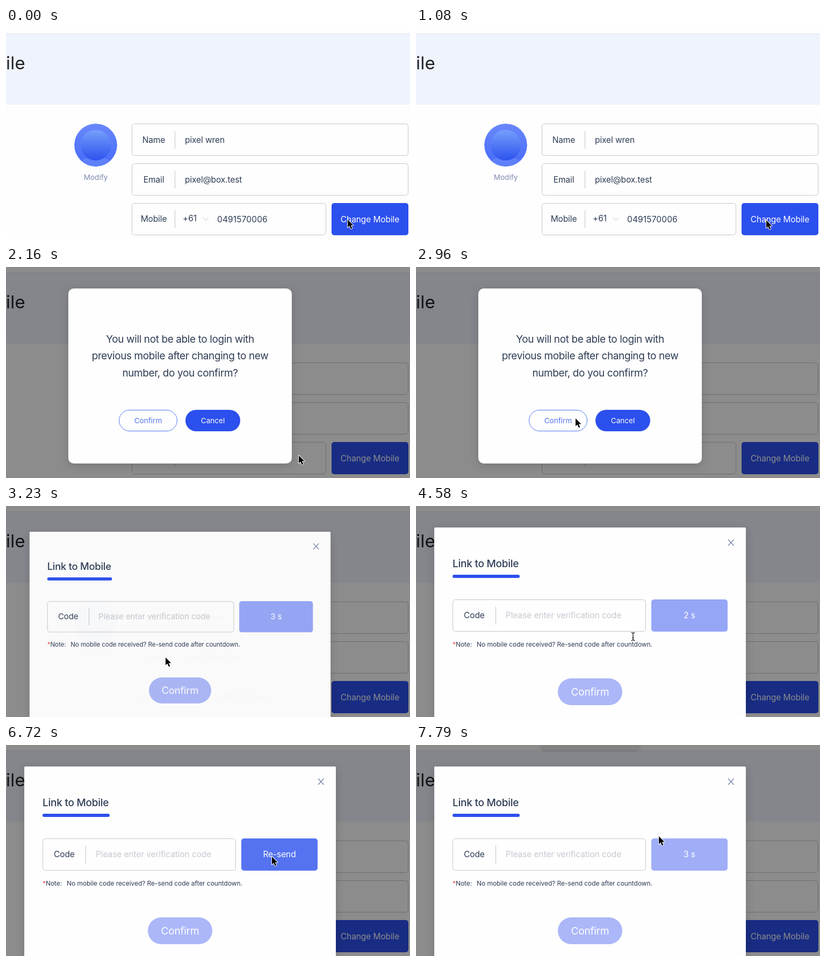
An HTML page for the animation above (8000 ms loop, 752 by 393 pixels).

```html
<!DOCTYPE html>
<html lang="en">
<head>
<meta charset="utf-8">
<title>Change mobile</title>
<style>
html, body { margin: 0; width: 100%; height: 100%; overflow: hidden; background: #fefefe; }
svg { display: block; }
text { font: 15.5px Inter, sans-serif; letter-spacing: -.1px; fill: #2e3c54; }
.mid { text-anchor: middle; }
.white { fill: #fff; }
.field { fill: none; stroke: #c5c6ca; }
.line { stroke: #c5c6ca; fill: none; }
.small { font-size: 13.6px; letter-spacing: 0; }
.big { font-size: 19px; letter-spacing: -.39px; }
.note { font-size: 12px; letter-spacing: -.06px; }
.panel { fill: #fefefe; filter: drop-shadow(0 4px 8px rgba(0, 0, 0, .15)); }
#arrow path { fill: #000; stroke: #fff; stroke-width: 2; paint-order: stroke; stroke-linejoin: round; }
</style>
</head>
<body>
<svg width="752" height="393" viewBox="0 0 752 393">
  <defs>
    <linearGradient id="ring" x2="0" y2="1"><stop stop-color="#6a88fc"/><stop offset="1" stop-color="#4469f8"/></linearGradient>
    <linearGradient id="disc" x2="0" y2="1"><stop stop-color="#77a0fc"/><stop offset="1" stop-color="#2c52ee"/></linearGradient>
    <clipPath id="round"><circle cx="167" cy="218" r="40"/></clipPath>
  </defs>

  <g id="page">
    <rect width="752" height="393" fill="#fefefe"/>
    <rect y="10" width="752" height="133" fill="#eff3fc"/>
    <path d="M0 10.5H752" stroke="#e2e5ec"/>
    <text x="36" y="77" style="font-size:33px;letter-spacing:.3px;fill:#202226;text-anchor:end">ile</text>

    <g clip-path="url(#round)">
      <circle cx="167" cy="218" r="40" fill="url(#ring)"/>
      <ellipse cx="167" cy="258" rx="34" ry="18" fill="#5f80fb"/>
      <circle cx="167" cy="218" r="29" fill="url(#disc)" stroke="#5b7cf9"/>
    </g>
    <text class="small mid" x="167" y="283" style="fill:#7f8bb0">Modify</text>

    <rect class="field" x="234.5" y="178.5" width="514" height="59" rx="5"/>
    <rect class="field" x="234.5" y="252.5" width="514" height="59" rx="5"/>
    <rect class="field" x="234.5" y="326.5" width="361" height="59" rx="5"/>
    <path class="line" d="M314.5 192v33m0 41v33m0 40v33M367 353l5 6 5-6"/>
    <text class="mid" x="275" y="214">Name</text>
    <text class="mid" x="275" y="288">Email</text>
    <text class="mid" x="275" y="361">Mobile</text>
    <text x="333" y="214">pixel wren</text>
    <text x="333" y="288">pixel@box.test</text>
    <text x="329" y="360">+61</text>
    <text x="393" y="361.5" style="letter-spacing:.15px">0491570006</text>
    <rect id="change" x="606" y="326" width="143" height="60" rx="5"/>
    <text class="mid white" x="677.5" y="362">Change Mobile</text>
  </g>

  <rect id="mask" width="752" height="393" fill="#000" opacity=".45"/>
  <rect id="toast" x="230" y="-20" width="189" height="33" rx="13" opacity=".07"/>

  <g id="warning">
    <rect class="panel" x="116" y="40" width="416" height="326" rx="10"/>
    <text class="big mid" x="324" y="141">You will not be able to login with</text>
    <text class="big mid" x="324" y="172">previous mobile after changing to new</text>
    <text class="big mid" x="324" y="204">number, do you confirm?</text>
    <rect x="210.5" y="266.5" width="108" height="39" rx="19.5" fill="none" stroke="#5577f1"/>
    <text class="small mid" x="264.5" y="291" style="fill:#5272f0">Confirm</text>
    <rect id="cancel" x="334" y="266" width="102" height="40" rx="20"/>
    <text class="small mid white" x="385" y="291">Cancel</text>
  </g>

  <g id="link">
    <rect class="panel" x="34" y="40" width="580" height="464" rx="2"/>
    <path d="M581 62.5l10.5 11.5m0-11.5L581 74" stroke="#7d89ae" stroke-width="1.5"/>
    <text class="big" x="68" y="114" style="font-weight:500;letter-spacing:-.25px">Link to Mobile</text>
    <rect x="68" y="128" width="125" height="6" rx="3" fill="#2c50ed"/>
    <rect class="field" x="68.5" y="174.5" width="359" height="59" rx="5"/>
    <path class="line" d="M148.5 187v34"/>
    <text x="89" y="209">Code</text>
    <text x="167" y="209" style="fill:#c6c9d1">Please enter verification code</text>
    <rect id="send" x="438" y="174" width="142" height="60" rx="5"/>
    <text id="count" class="mid white" x="509" y="209"></text>
    <text class="note" x="68" y="262"><tspan fill="#f0484e">*</tspan>Note:</text>
    <text class="note" x="113" y="262">No mobile code received? Re-send code after countdown.</text>
    <rect x="264" y="321" width="120" height="50" rx="25" fill="#abb7f8"/>
    <text class="big mid white" x="324" y="353" style="letter-spacing:-.15px">Confirm</text>
  </g>

  <g id="cursor">
    <g id="arrow">
      <path d="M0 0V14.6L3.4 11.5 6 17.2 8.3 16.2 5.8 10.6H10.5Z"/>
      <g id="banned" fill="none">
        <circle cx="10" cy="23" r="7.5" fill="#fff" stroke="#fff" stroke-width="4"/>
        <circle cx="10" cy="23" r="7.2" stroke="#8d8d90" stroke-width="2" fill="#e9e9ee"/>
        <line x1="5" y1="18" x2="15" y2="28" stroke="#8d8d90" stroke-width="2"/>
      </g>
    </g>
    <g id="beam" fill="none">
      <path d="M-3.5-7.5Q0-7.5 0-5Q0-7.5 3.5-7.5M0-5V5M-3.5 7.5Q0 7.5 0 5Q0 7.5 3.5 7.5M-1.5 2.5h3" stroke="#fff" stroke-width="3"/>
      <path d="M-3.5-7.5Q0-7.5 0-5Q0-7.5 3.5-7.5M0-5V5M-3.5 7.5Q0 7.5 0 5Q0 7.5 3.5 7.5M-1.5 2.5h3" stroke="#000" stroke-width="1.2"/>
    </g>
  </g>
</svg>
<script>
const LOOP = 8000;
const el = id => document.getElementById(id);
const show = (id, on) => { el(id).style.display = on ? '' : 'none'; };
const BLUE = '#2c50ed', HOVER = '#5573f0', OFF = '#96a6f7', OFF_HOVER = '#abb7f8';

// Each track lists [start time, value...]; values hold until the next entry.
const pointer = [
  [0, 'arrow', 636, 357], [270, 'arrow', 657, 354], [540, 'arrow', 621, 375],
  [810, 'arrow', 661, 357], [1080, 'arrow', 652, 358], [1890, 'arrow', 656, 353],
  [2160, 'arrow', 545, 351], [2420, 'arrow', 395, 303], [2690, 'arrow', 305, 292],
  [2960, 'arrow', 297, 282], [3500, 'beam', 290, 226], [3770, 'beam', 290, 215.5],
  [4040, 'beam', 382, 215], [4310, 'beam', 408, 201], [4580, 'beam', 404, 243],
  [4850, 'arrow', 463, 304], [5120, 'arrow', 522, 249], [5390, 'banned', 492, 225],
  [5650, 'banned', 486, 217], [5920, 'banned', 488, 217], [6190, 'arrow', 490, 208],
  [6720, 'arrow', 495, 208], [7260, 'banned', 494, 207], [7530, 'banned', 472, 190],
  [7790, 'arrow', 452, 170]
];
const changeFill = [[0, BLUE], [1620, HOVER], [2160, BLUE]];
const cancelFill = [[0, BLUE], [2420, HOVER], [2690, '#3f60ee'], [2960, BLUE]];
const sendFill = [[0, OFF], [5390, '#a0aef7'], [5650, OFF_HOVER], [6190, '#8095f4'],
  [6450, HOVER], [7260, '#8095f4'], [7530, OFF_HOVER], [7790, '#a0aef7']];
const label = [[0, '3 s'], [4310, '2 s'], [5120, '1 s'], [6190, 'Re-send'], [7260, '3 s']];

const at = (track, t) => track.findLast(step => step[0] <= t).slice(1);
const fill = (id, track, t) => el(id).setAttribute('fill', at(track, t)[0]);

function draw(t) {
  fill('change', changeFill, t);
  fill('cancel', cancelFill, t);
  fill('send', sendFill, t);
  el('count').textContent = at(label, t)[0];

  show('mask', t >= 2160);
  show('warning', t >= 2160 && t < 3230);
  show('link', t >= 3230);
  show('toast', t >= 7790);

  const opening = t < 3500;
  el('link').setAttribute('transform', opening ? 'translate(324 272) scale(.966) translate(-324 -272)' : '');
  el('link').setAttribute('opacity', opening ? .97 : 1);

  const [kind, x, y] = at(pointer, t);
  el('cursor').setAttribute('transform', `translate(${x} ${y})`);
  show('arrow', kind !== 'beam');
  show('banned', kind === 'banned');
  show('beam', kind === 'beam');
}

const start = performance.now();
function tick() {
  draw((performance.now() - start) % LOOP);
  requestAnimationFrame(tick);
}
tick();
</script>
</body>
</html>
```
